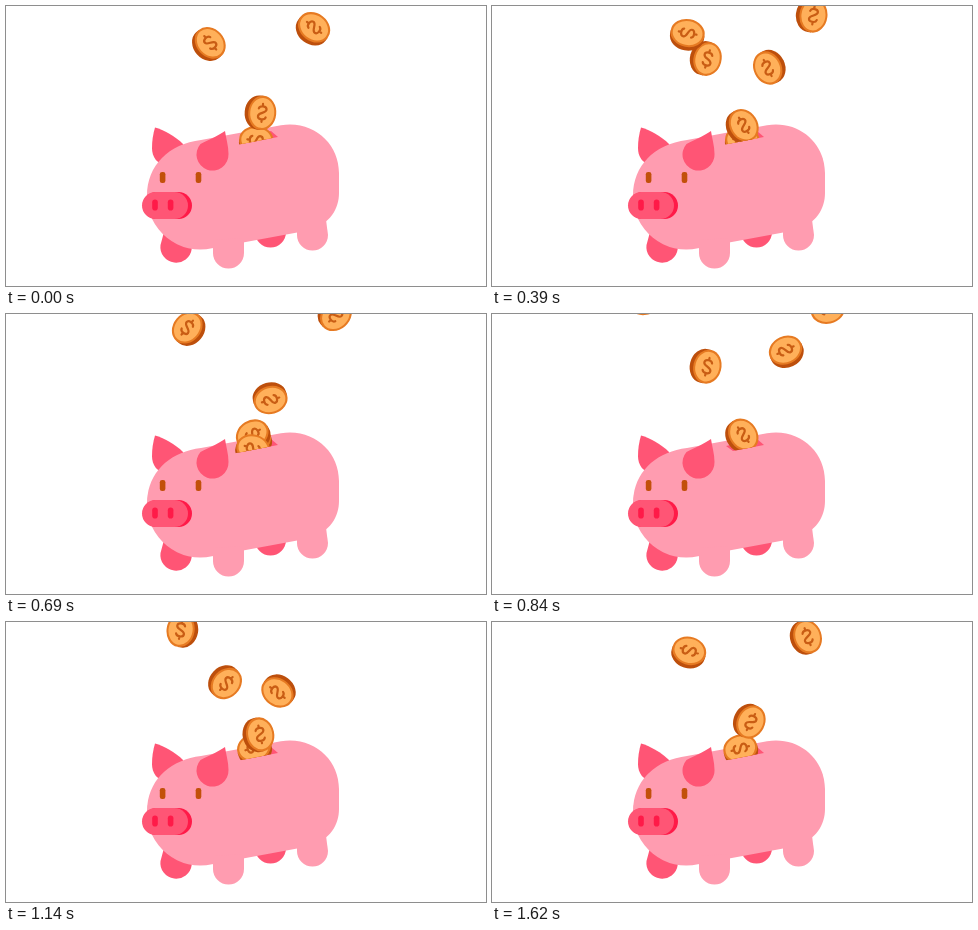
An HTML page that plays this animation: 480 by 280 pixels, repeating every 1.65 s.

```html
<!DOCTYPE html>
<html lang="en">
<head>
<meta charset="utf-8">
<title>Piggy bank</title>
<style>
  html, body { margin: 0; width: 100%; height: 100%; overflow: hidden; background: #fff; }
  svg { display: block; width: 480px; height: 280px; }
  .skin { fill: #ff9cb0; }
  .dark { fill: #ff5575; }
  .deep { fill: #ff1a48; }
  .eye { fill: #c2500a; }
</style>
</head>
<body>
<svg viewBox="0 0 480 280">
  <defs>
    <clipPath id="lip"><path d="M0 0H480V90.7L0 183.6Z"/></clipPath>
    <g id="coin">
      <path fill="#bd4f0c" d="M-1.5 -17.2H1.8A14 17.2 0 0 1 1.8 17.2H-1.5Z"/>
      <ellipse cx="-1.8" rx="14" ry="17.2" fill="#e67a22"/>
      <ellipse cx="-1.8" rx="12" ry="15" fill="#ffb05a"/>
      <path transform="translate(-1.8 0)" fill="none" stroke="#c95d14" stroke-width="2.2" stroke-linecap="round"
        d="M3.8 -4.2C3 -7.4 -4 -7.4 -4 -3.6C-4 .2 4 -.2 4 3.6C4 7.4 -3 7.4 -3.8 4.2M0 -9V-6.6M0 6.6V9"/>
    </g>
  </defs>

  <g class="dark">
    <path d="M149 121.5C158 124 169 130 177 138C182 150 173 159 162 159C151 159 146 151 146 142C146 135 147 128 149 121.5Z"/>
    <path d="M158 226L154.5 239A15.7 15.7 0 1 0 185.7 243V226Z"/>
    <path d="M249 222V226A15.5 15.5 0 0 0 280 226V220Z"/>
  </g>
  <g class="skin">
    <path d="M141 190C141 159 163 138 195 134L275 119.2C308 114 333 138 333 167V187C333 202 325 218 302 224.5L206 242.3A53.5 53.5 0 0 1 141 190Z"/>
    <path d="M207 234V247A15.5 15.5 0 0 0 238 247V232Z"/>
    <path d="M291 220V229A15.5 15.5 0 0 0 322 229L319 206Z"/>
  </g>
  <path class="dark" d="M219 125C220 132 222.500 140 222.500 148A16 16 0 1 1 194.500 138C202 134 212 130 219 125Z"/>
  <path class="dark" d="M234 132L265 125L272 131L241 137Z"/>
  <g class="eye">
    <rect x="153.800" y="166" width="5.600" height="11" rx="2.300"/>
    <rect x="189.700" y="166" width="5.600" height="11" rx="2.300"/>
  </g>
  <rect class="deep" x="137" y="186" width="49" height="27" rx="13.500"/>
  <rect class="dark" x="136" y="186" width="46" height="27" rx="13.500"/>
  <g class="deep">
    <rect x="146.200" y="193.500" width="5.600" height="11" rx="2.800"/>
    <rect x="161.800" y="193.500" width="5.600" height="11" rx="2.800"/>
  </g>
  <g id="coins" clip-path="url(#lip)"></g>
</svg>
<script>
  const LOOP = 1650, LEAD = 100, SPEED = 0.25;
  const layer = document.getElementById('coins');

  // Moment each coin's centre passes the top edge, in ms
  const left = [[181], [298, 0.31], [632], [900], [1108], [1499]];
  const right = [[146], [354], [690], [865], [1224], [1560]];

  function addCoin([start, speed = SPEED], flip) {
    const el = document.createElementNS('http://www.w3.org/2000/svg', 'use');
    el.setAttribute('href', '#coin');
    layer.append(el);
    return { el, start, speed, flip };
  }

  const coins = [
    ...left.map(c => addCoin(c, false)),
    ...right.map(c => addCoin(c, true))
  ];

  function place({ el, start, speed, flip }, time) {
    const age = (time - start + LEAD + LOOP) % LOOP - LEAD;
    const y = age * speed;
    const shown = y < 160;
    el.style.display = shown ? '' : 'none';
    if (!shown) return;
    const x = 168 + 1.04 * y - 0.0032 * y * y;
    const turn = (flip ? -50 : -28) + 4.7 * y - 0.0085 * y * y;
    const mirror = flip ? 'translate(497 0) scale(-1 1) ' : '';
    el.setAttribute('transform', `${mirror}translate(${x} ${y}) rotate(${turn})`);
  }

  function draw() {
    const time = performance.now() % LOOP;
    coins.forEach(c => place(c, time));
    requestAnimationFrame(draw);
  }
  draw();
</script>
</body>
</html>
```
